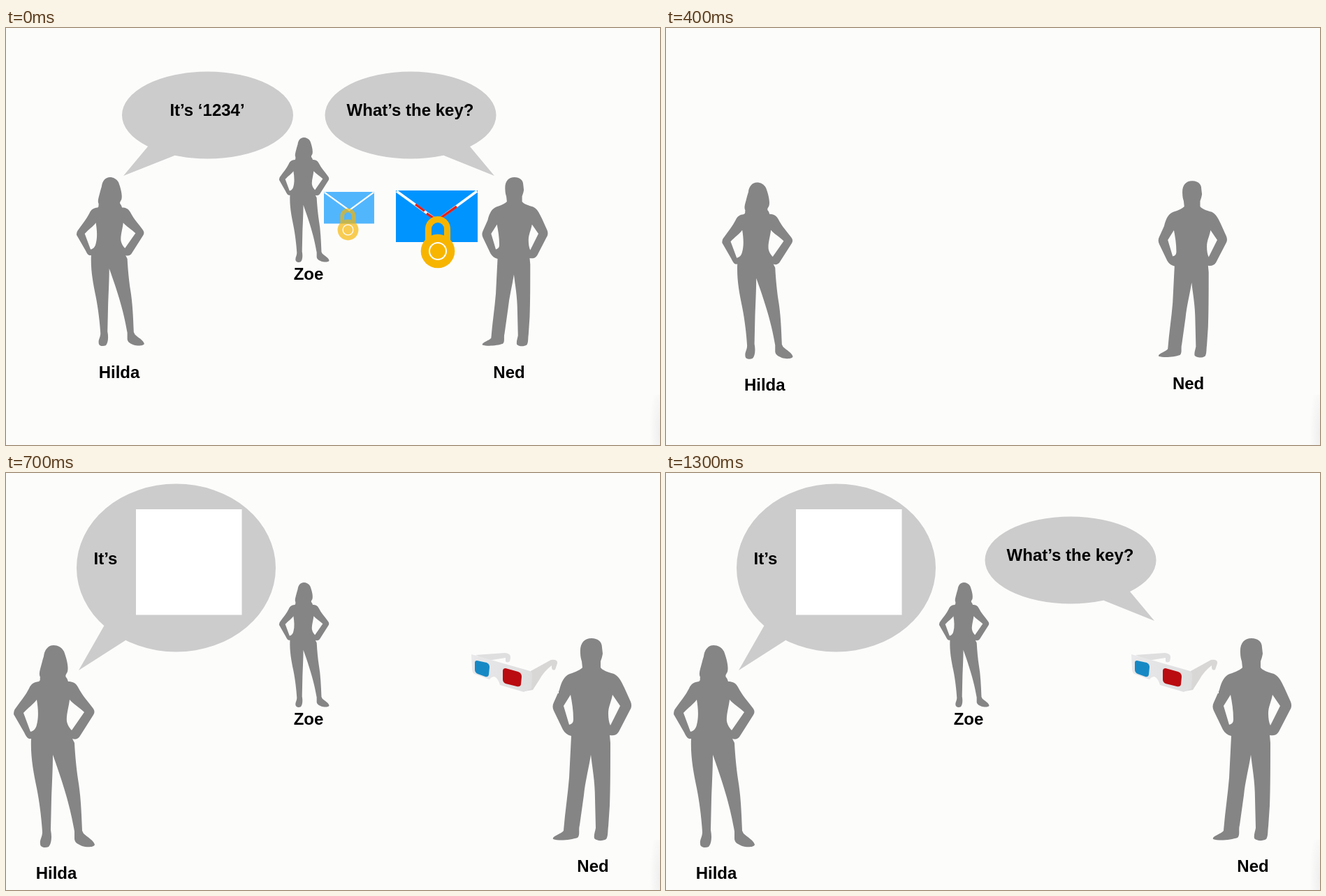
An HTML page that plays this animation: 936 px wide and 598 px high, repeating every 1400 ms.

```html
<!DOCTYPE html>
<html lang="en">
<head>
<meta charset="utf-8">
<title>Sharing a key</title>
<style>
  html, body { margin: 0; width: 100%; height: 100%; overflow: hidden; background: #fcfcfb; }
  svg { display: block; width: 936px; height: 598px; animation: scene 1400ms step-end infinite; }
  text { font: bold 24px "Liberation Sans", Arial, sans-serif; text-anchor: middle; }

  /* --p: walk progress, --old / --new / --ask: opacity of each set */
  @keyframes scene {
    0%     { --p: 0;    --old: 1;   --new: 0;   --ask: 0; }
    21.42% { --p: .014; --old: .84; --new: 0;   --ask: 0; }
    28.57% { --p: .23;  --old: 0;   --new: 0;   --ask: 0; }
    35.71% { --p: .59;  --old: 0;   --new: 0;   --ask: 0; }
    42.85% { --p: .91;  --old: 0;   --new: .28; --ask: 0; }
    50%    { --p: 1;    --old: 0;   --new: 1;   --ask: 0; }
    92.85% { --p: 1;    --old: 0;   --new: 1;   --ask: 1; }
    100%   { --p: 1;    --old: 0;   --new: 1;   --ask: 1; }
  }

  .old { opacity: var(--old); }
  .new { opacity: var(--new); }
  .ask { opacity: var(--ask); }
  .move {
    transform: translate(calc((var(--x) + var(--dx) * var(--p)) * 1px),
                         calc((var(--y) + var(--dy) * var(--p)) * 1px));
  }
  .grow { transform: scale(calc(.835 + .165 * var(--p))); }
  .person { fill: #858585; fill-rule: evenodd; }
  .bubble { fill: #ccc; }
  .faint { opacity: .67; }
</style>
</head>
<body>
<svg viewBox="0 0 936 598">
  <defs>
    <path id="woman" class="person" d="M57 0C63 0 69 3 72 9C75 17 79 30 77 38C76 41 73 43 75 46C77 48 77 50 78 52
      C84 52 89 54 92 60C98 72 106 80 114 91C116 94 116 97 114 100L95 130C93 134 88 136 84 134
      L87 140C88 160 90 178 92 192C96 215 97 240 98 266L100 270C106 276 114 279 116 286
      C115 290 104 290 98 288C92 285 88 284 87 278L87 267C82 238 75 210 56 157
      C56 175 55 195 54 220L53 265C55 275 54 285 50 289C45 291 38 290 38 285C37 279 41 275 41 268
      C40 250 37 225 33 205C28 180 24 160 25 134C20 135 18 131 15 125L0 99C0 95 1 92 3 90
      C10 80 17 72 22 62C25 55 29 53 36 52C39 50 37 48 38 46C36 42 37 38 38 34
      C40 27 41 22 43 16C44 6 50 0 57 0Z
      M33 78C29 84 20 90 14 97L24 124C29 123 32 119 33 114C36 103 35 90 33 78Z
      M80 78C79 88 75 100 76 109C77 115 81 120 83 122L101 96C95 90 85 84 80 78Z"/>
    <path id="man" class="person" d="M56 0C65 0 71 5 71 13L72 22C71 28 70 30 69 33L69 42C72 46 78 48 88 51
      C96 55 99 63 103 71L112 91C114 96 113 100 111 103L95 134C92 139 87 140 82 139
      L83 150C83 180 83 215 82 240L80 270C79 276 80 284 77 288C72 291 64 291 60 287
      C59 282 61 278 62 272L61 230C61 205 57 185 55 167C52 187 47 205 45 225L39 268
      C37 275 40 282 36 286C27 289 10 291 1 288C-1 284 12 281 16 276C18 250 22 225 24 200
      L27 140C22 139 18 136 15 131L2 104C0 100 0 96 2 92L10 74C13 62 17 54 25 51
      C34 48 40 45 43 42L42 33C41 30 40 26 40 21C39 8 45 0 56 0Z
      M26 81L16 97L24 124C28 123 30 121 30 116C30 103 28 92 26 81Z
      M86 81C84 92 80 98 80 108C80 115 81 121 83 125L97 97Z"/>
    <g id="envelope">
      <rect width="117" height="74" fill="#0094ff"/>
      <path d="M1 1L59 43L116 1" fill="none" stroke="#fff" stroke-width="3.6"/>
    </g>
    <g id="lock" fill="none">
      <path d="M-13.5 -12V-32a13.5 13.5 0 0 1 27 0V-12" stroke="#f7b500" stroke-width="9"/>
      <circle r="24.3" fill="#f7b500"/>
      <circle r="12" stroke="#fff" stroke-width="2"/>
    </g>
    <g id="question">
      <path class="bubble" d="M456.5 125a122.5 62.5 0 0 1 245 0a122.5 62.5 0 0 1 -245 0ZM627 183L620 160L664 170L699 212Z"/>
      <text x="578.5" y="126">What’s the key?</text>
    </g>
    <g id="watcher">
      <use href="#woman" transform="translate(391 157) scale(.617)"/>
      <text x="433" y="361">Zoe</text>
    </g>
    <radialGradient id="shade" cx="1" cy=".75" r="1">
      <stop offset="0" stop-color="#eee"/>
      <stop offset="1" stop-color="#eee" stop-opacity="0"/>
    </radialGradient>
    <linearGradient id="card" x2="1">
      <stop offset="0" stop-color="#e9e8ea"/>
      <stop offset="1" stop-color="#dededf"/>
    </linearGradient>
  </defs>

  <rect width="936" height="598" fill="#fcfcfb"/>
  <rect x="921" y="526" width="15" height="72" fill="url(#shade)"/>

  <g class="move" style="--x:101;--dx:-90;--y:214;--dy:33"><use class="grow" href="#woman"/></g>
  <text class="move" style="--x:162;--dx:-90;--y:501.5;--dy:80">Hilda</text>
  <g class="move" style="--x:681;--dx:101;--y:214;--dy:23"><use class="grow" href="#man"/></g>
  <text class="move" style="--x:720;--dx:120;--y:501.5;--dy:70">Ned</text>

  <g class="old">
    <path class="bubble" d="M166 125a122.5 62.5 0 0 1 245 0a122.5 62.5 0 0 1 -245 0ZM203 170L248 160L241 183L168 212Z"/>
    <text x="288" y="126">It’s ‘1234’</text>
    <use href="#question"/>
    <use href="#watcher"/>
    <use class="faint" href="#envelope" transform="translate(455 235) scale(.615)"/>
    <use class="faint" href="#lock" transform="translate(489.5 289.5) scale(.615)"/>
    <use href="#envelope" x="558" y="233"/>
    <path d="M586 253L599 262.5M602 266L617 276L645 256" fill="none" stroke="#e3231b" stroke-width="3.4"/>
    <use href="#lock" x="618" y="320"/>
  </g>

  <g class="new">
    <path class="bubble" d="M101 136a142.5 120.5 0 0 1 285 0a142.5 120.5 0 0 1 -285 0ZM141 218L180 200L171 240L104 283Z"/>
    <text x="142.5" y="131">It’s</text>
    <rect x="186" y="52" width="151.5" height="151.5" fill="#fff"/>
    <use href="#watcher"/>
    <g>
      <rect x="664" y="256" width="127" height="60" fill="#fcfcfb"/>
      <path d="M672 261L714 258Q723 259 722 265L721 270Q717 273 715 270L715 265L690 269Z" fill="#dfdfe0"/>
      <path d="M751 284L780 268Q790 267 789 273L786 282Q781 284 781 278L781 276Q770 284 763 297L754 311L742 313Z" fill="#d9d7d6"/>
      <path d="M666 260L750 284Q754 286 753 292L752 309L741 314L707 304Q704 294 699 292Q695 292 692 296L670 288Q667 286 667 280Z" fill="url(#card)"/>
      <path d="M674 269L688 272Q692 274 692 278L691 289Q690 293 686 292L675 288Q671 286 671 282L671 272Q671 269 674 269Z" fill="#1689c5"/>
      <path d="M715 280L733 285Q738 287 738 292L737 303Q736 307 731 306L715 302Q711 300 711 296L711 284Q711 280 715 280Z" fill="#b90b10"/>
    </g>
  </g>

  <use class="ask" href="#question"/>
</svg>
</body>
</html>
```
